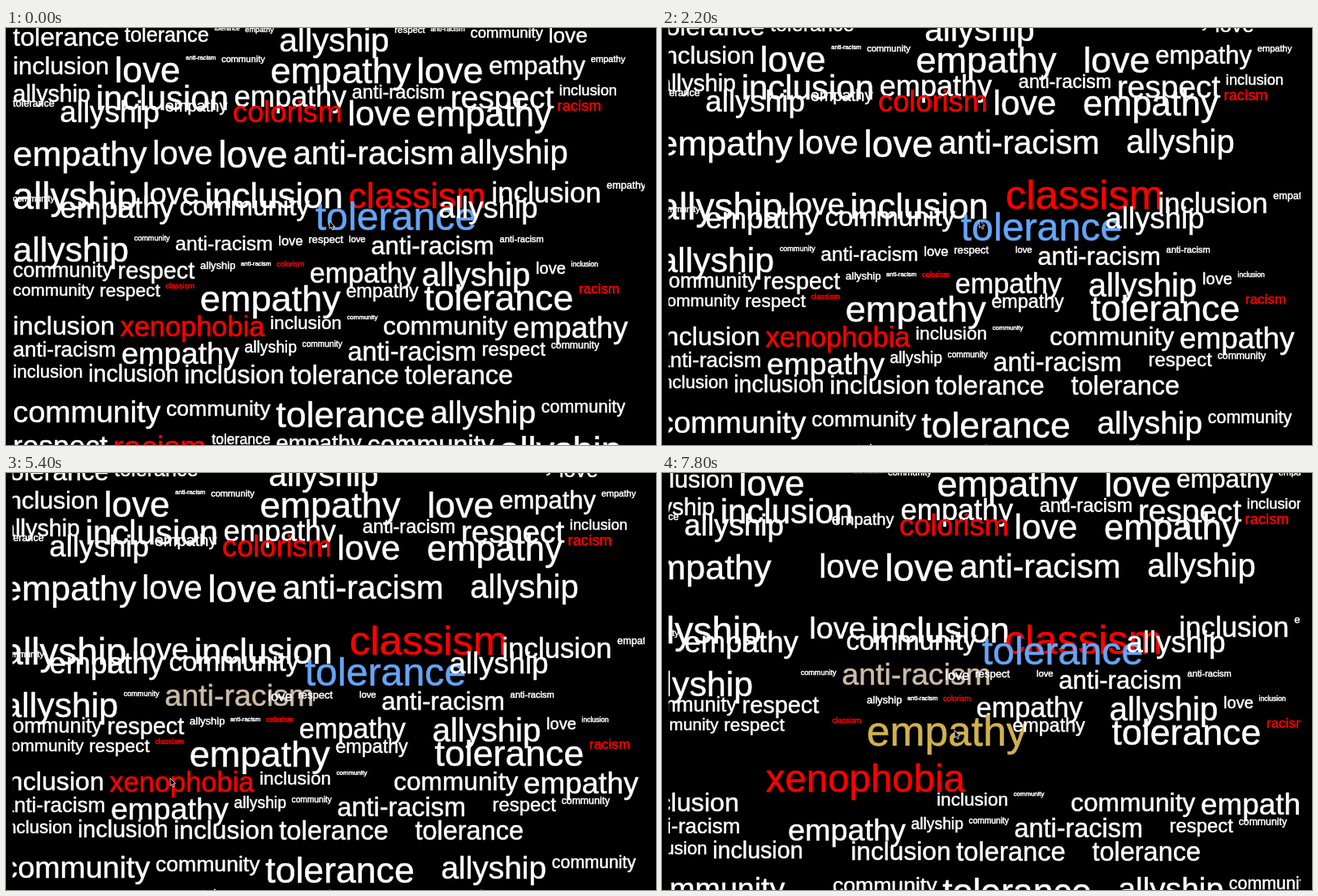
An HTML page with a canvas for the animation above (8 s loop, 800 by 514 pixels).

```html
<!DOCTYPE html>
<html lang="en">
<head>
<meta charset="utf-8">
<title>Word wall</title>
<style>
  html, body { margin: 0; width: 100%; height: 100%; overflow: hidden; background: #000; }
  canvas { display: block; width: 800px; height: 514px; }
</style>
</head>
<body>
<canvas id="stage" width="800" height="514"></canvas>
<script>
const ctx = document.getElementById('stage').getContext('2d');
const LOOP = 8000, TICK = 200;
const LEFT = 8, RIGHT = 786, START = 8.6, GAP = 6.7, ASCENT = 0.775;
const PUSH = 13, GROW = 6.5, HOP = 7, HOP_TIME = 600;
const FAMILY = '"Liberation Sans", Arial, sans-serif';
const RED = new Set(['racism', 'colorism', 'classism', 'xenophobia']);

// One row per line: top edge, then words with their font sizes.
const WALL = `
-2.5 tolerance 31.8 tolerance 25.2 tolerance 7.6 empathy 9.2 allyship 40.6 respect 11.4 anti-racism 8.7 community 18.5 love 26.2
33 inclusion 30.4 love 44.2 anti-racism 7.6 community 11.1 empathy 45.1 love 44.9 empathy 31 empathy 11.1
68.6 allyship 28.6 inclusion 42 empathy 36.1 anti-racism 23.4 respect 38.8 inclusion 18.3
87.6 tolerance 12.4 allyship 36.8 empathy 20 colorism 36.2 love 42.4 empathy 43.5 racism 18.4
136.4 empathy 43 love 40.5 love 46.5 anti-racism 40.6 allyship 40
187.8 allyship 45.9 love 37.8 inclusion 43.8 classism 44.2 inclusion 34.7 empathy 12.6
205.6 community 10.6 empathy 36.6 community 33.2 tolerance 35.3 allyship 36.6
255 allyship 42.7 community 9.1 anti-racism 24.6 love 16.5 respect 13.1 love 11.3 anti-racism 31 anti-racism 11.1
287 community 25.3 respect 28.9 allyship 13 anti-racism 7.6 colorism 9.2 empathy 34.2 allyship 40.1 love 20.1 inclusion 8.5
313.8 community 20.7 respect 22.7 classism 9.3 empathy 45.1 empathy 23.3 tolerance 44.7 racism 17
353 inclusion 32.2 xenophobia 34.4 inclusion 22.6 community 7.8 community 31.7 empathy 36.9
385 anti-racism 25.9 empathy 37.8 allyship 19.3 community 10.2 anti-racism 32.4 respect 23.9 community 12.3
413.5 inclusion 22.1 inclusion 28.6 inclusion 31.7 tolerance 32.7 tolerance 32.5
457.3 community 37.6 community 26.6 tolerance 44.6 allyship 38.9 community 21.4
499.7 respect 35.5 racism 39 tolerance 17.6 empathy 27.5 community 32.3 allyship 45.1`;

function layout() {
  return WALL.trim().split('\n').map(line => {
    const [top, ...parts] = line.split(' ');
    const row = [];
    let x = START;
    for (let i = 0; i < parts.length; i += 2) {
      const text = parts[i], size = +parts[i + 1];
      ctx.font = `${size}px ${FAMILY}`;
      row.push({ text, size, x, top: +top, base: size * ASCENT, color: RED.has(text) ? '#f00' : '#fff' });
      x += ctx.measureText(text).width + GAP;
    }
    return row;
  });
}

const rows = layout();
const words = rows.flat();

// A word that has already been clicked twice before the loop begins.
Object.assign(rows[6][3], { color: '#65a5f7', size: rows[6][3].size + 2 * GROW, top: rows[6][3].top + 15.8 });

const classism = words.indexOf(rows[5][3]);
const antiRacism = words.indexOf(rows[7][2]);
const xenophobia = words.indexOf(rows[10][1]);
const empathy = words.indexOf(rows[9][3]);

// Red words push the others away; white words only grow and take a color.
const clicks = [
  { at: 1400, id: classism },
  { at: 3800, id: antiRacism, color: '#cdbba8' },
  { at: 4200, id: antiRacism, color: '#cdbba8' },
  { at: 5600, id: xenophobia },
  { at: 6600, id: xenophobia },
  { at: 7200, id: empathy, color: '#d0b24e' }
];

const pointer = [
  [0, 398, 238], [400, 398, 238], [1200, 464, 212], [1600, 464, 212],
  [3000, 277, 275], [3600, 263, 278], [4800, 263, 278],
  [5400, 202, 376], [6200, 206, 377], [6600, 206, 377], [7200, 360, 317]
];

function pointerAt(t) {
  const n = pointer.findIndex(k => k[0] > t);
  if (n < 0) return pointer[pointer.length - 1].slice(1);
  const [t0, x0, y0] = pointer[n - 1], [t1, x1, y1] = pointer[n];
  const u = (t - t0) / (t1 - t0), e = u * u * (3 - 2 * u);
  return [x0 + (x1 - x0) * e, y0 + (y1 - y0) * e];
}

function stateAt(t) {
  const now = words.map(w => ({ ...w, hop: 0, pinned: false }));
  for (const { at, id, color } of clicks) {
    if (at > t) break;
    const hit = now[id];
    hit.size += GROW;
    hit.hop = -HOP * Math.max(0, 1 - (t - at) / HOP_TIME);
    if (color) {
      hit.color = color;
      continue;
    }
    hit.pinned = true;
    for (const w of now) {
      if (w.pinned) continue;
      w.x += w.x > hit.x ? PUSH : -PUSH;
      w.top += w.top >= hit.top ? PUSH : -PUSH;
    }
  }
  return now;
}

function drawWord(w, tick) {
  const shakeX = w.pinned ? 0.7 + 0.7 * Math.sin(tick * 2.4) : 0;
  const shakeY = w.pinned ? 0.8 + 0.8 * Math.sin(tick * 1.7) : 0;
  const x = w.x + shakeX, y = w.top + w.base + w.hop + shakeY;
  ctx.font = `${w.size}px ${FAMILY}`;
  ctx.fillStyle = ctx.strokeStyle = w.color;
  ctx.fillText(w.text, x, y);
  // A hairline outline gives the letters their soft, slightly heavy look.
  ctx.lineWidth = 0.5;
  ctx.strokeText(w.text, x, y);
}

function drawPointer(x, y) {
  ctx.save();
  ctx.translate(x, y);
  ctx.beginPath();
  for (const [px, py] of [[0, 0], [0, 9.5], [2.2, 7.6], [3.8, 11], [5.4, 10.3], [3.9, 7], [6.8, 6.8]]) ctx.lineTo(px, py);
  ctx.closePath();
  ctx.fillStyle = '#000';
  ctx.strokeStyle = '#ddd';
  ctx.lineWidth = 0.9;
  ctx.fill();
  ctx.stroke();
  ctx.restore();
}

function draw(t) {
  ctx.lineJoin = 'round';
  ctx.fillStyle = '#000';
  ctx.fillRect(0, 0, 800, 514);
  ctx.save();
  ctx.beginPath();
  ctx.rect(LEFT, 0, RIGHT - LEFT, 514);
  ctx.clip();
  for (const w of stateAt(t)) drawWord(w, t / TICK);
  ctx.restore();
  drawPointer(...pointerAt(t));
}

const start = performance.now();
function loop() {
  const t = (performance.now() - start) % LOOP;
  draw(Math.floor(t / TICK) * TICK);
  requestAnimationFrame(loop);
}
loop();
</script>
</body>
</html>
```
